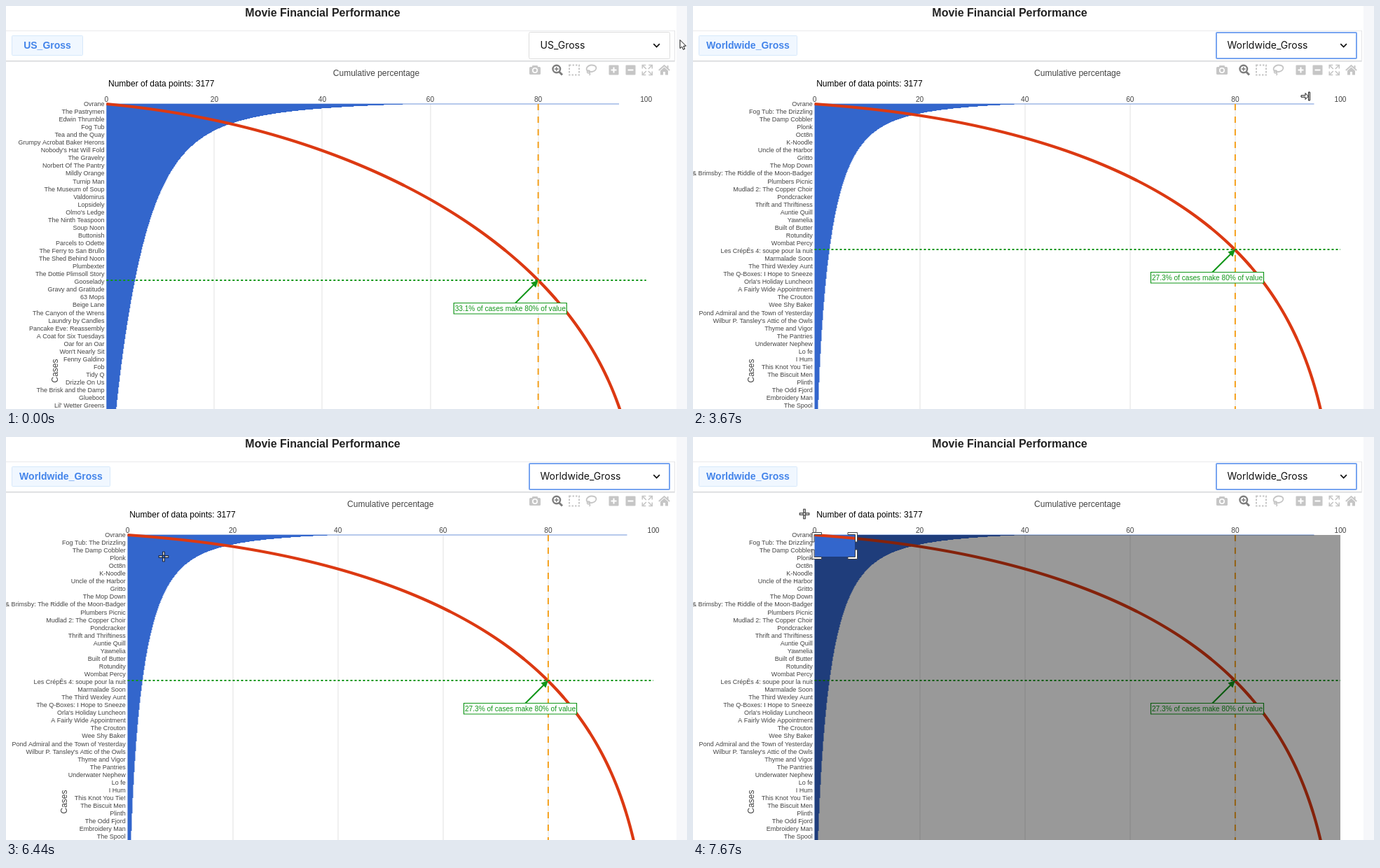
These frames come from a looping animation (972x576 px, 8000 ms). An HTML page with a canvas:

```html
<!DOCTYPE html>
<html lang="en">
<head>
<meta charset="utf-8">
<title>Pareto chart</title>
<style>
html, body { margin: 0; width: 100%; height: 100%; overflow: hidden; background: #fff; }
canvas { display: block; }
</style>
</head>
<body>
<canvas id="stage" width="972" height="576"></canvas>
<script>
const ctx = document.getElementById('stage').getContext('2d');
const LOOP = 8000, TICK = 1000 / 9, TAU = Math.PI * 2;
const TOP = 140, BOTTOM = 576, FULL = 761;
const SANS = '"Liberation Sans", Arial, sans-serif';
const UI = 'Inter, "Open Sans", sans-serif';
const BLUE = '#3366cc', RED = '#dc3912', ORANGE = '#f5a11d', GREEN = '#109618', INK = '#444';
const OPTIONS = ['US_Gross', 'Worldwide_Gross', 'US_DVD_Sales', 'CRIT_Votes'];

// Times of the state changes, in ticks
const OPEN = 14, HOVER = 21, PICK = 26, SWAP = 32, RESIZE = 33, CROSS = 48, DRAG = 59;

// base, peak, decay and rise shape the distribution; barScale turns density into pixels
const usChart = {
  name: OPTIONS[0], tagWidth: 102, x0: 143.3, x1: 913.7, casesX: 69.5, top: 875, cut: 0.331,
  base: 3.5, peak: 7, decay: 0.015, rise: 10, barScale: 41.7,
  labels: `Ovrane|The Pastrymen|Edwin Thrumble|Fog Tub|Tea and the Quay|Grumpy Acrobat Baker Herons
|Nobody's Hat Will Fold|The Gravelry|Norbert Of The Pantry|Mildly Orange|Turnip Man|The Museum of Soup
|Valdomirus|Lopsidely|Olmo's Ledge|The Ninth Teaspoon|Soup Noon|Buttonish|Parcels to Odette
|The Ferry to San Brullo|The Shed Behind Noon|Plumbexter|The Dottie Plimsoll Story|Gooselady
|Gravy and Gratitude|63 Mops|Beige Lane|The Canyon of the Wrens|Laundry by Candles
|Pancake Eve: Reassembly|A Coat for Six Tuesdays|Oar for an Oar|Won't Nearly Sit|Fenny Galdino|Fob
|Tidy Q|Drizzle On Us|The Brisk and the Damp|Glueboot|Lil' Wetter Greens`.split('|')
};
const worldChart = {
  name: OPTIONS[1], tagWidth: 141, x0: 173.5, x1: 924, casesX: 82.5, top: 886.5, cut: 0.273,
  base: 4.1, peak: 10, decay: 0.015, rise: 6, barScale: 21,
  labels: `Ovrane|Fog Tub: The Drizzling|The Damp Cobbler|Plonk|Oct8n|K-Noodle|Uncle of the Harbor|Gritto
|The Mop Down|Pottle & Brimsby: The Riddle of the Moon-Badger|Plumbers Picnic|Mudlad 2: The Copper Choir
|Pondcracker|Thrift and Thriftiness|Auntie Quill|Yawnelia|Built of Butter|Rotundity|Wombat Percy
|Les CrépÊs 4: soupe pour la nuit|Marmalade Soon|The Third Wexley Aunt|The Q-Boxes: I Hope to Sneeze
|Orla's Holiday Luncheon|A Fairly Wide Appointment|The Crouton|Wee Shy Baker
|Pond Admiral and the Town of Yesterday|Wilbur P. Tansley's Attic of the Owls|Thyme and Vigor|The Pantries
|Underwater Nephew|Lo fe|I Hum|This Knot You Tie!|The Biscuit Men|Plinth|The Odd Fjord|Embroidery Man
|The Spool`.split('|')
};

// Pointer key points: tick, x, y
const POINTER = [
  [5, 962, 48.5], [9, 946, 45], [12, 928, 50], [18, 928, 50], [22, 879, 127], [24, 880, 128],
  [32, 880, 128], [33, 874, 129], [47, 874, 129], [48, 547, 146], [51, 178, 264], [54, 231, 171],
  [57, 231, 171], [58, 225, 171], [61, 179, 162], [65, 161, 136.5], [67, 161, 135], [69, 159, 110]
];
const ZOOM_START = { x: 231, y: 171 }, ZOOM_MIN = 20, ZOOM_LAG = 0.6;

function pointerAt(k) {
  const i = POINTER.findIndex(p => p[0] > k);
  const b = POINTER.at(i), a = i > 0 ? POINTER[i - 1] : b;
  const f = a === b ? 0 : (k - a[0]) / (b[0] - a[0]);
  return { x: a[1] + (b[1] - a[1]) * f, y: a[2] + (b[2] - a[2]) * f };
}

function text(str, x, y, size, color, align = 'left', family = SANS, weight = '') {
  ctx.font = `${weight} ${size}px ${family}`;
  ctx.textAlign = align;
  ctx.fillStyle = color;
  ctx.fillText(str, x, y);
}
function rect(x, y, w, h, color) {
  ctx.fillStyle = color;
  ctx.fillRect(x, y, w, h);
}
function path(points, close) {
  ctx.beginPath();
  points.forEach(([x, y]) => ctx.lineTo(x, y));
  if (close) ctx.closePath();
}
function stroke(color, width, dash = []) {
  ctx.strokeStyle = color;
  ctx.lineWidth = width;
  ctx.setLineDash(dash);
  ctx.stroke();
  ctx.setLineDash([]);
}
function line(xa, ya, xb, yb, color, width, dash) {
  path([[xa, ya], [xb, yb]]);
  stroke(color, width, dash);
}
function box(x, y, w, h, r, fill, edge, width = 1) {
  ctx.beginPath();
  ctx.roundRect(x, y, w, h, r);
  ctx.fillStyle = fill;
  ctx.fill();
  if (edge) stroke(edge, width);
}
function outlined(points, fill, edge) {
  path(points, true);
  ctx.fillStyle = fill;
  ctx.fill();
  stroke(edge, 1);
}

// Share of the total value not yet covered by the first u of all cases
const remaining = (c, u) =>
  Math.exp(-c.base * u - c.peak * c.decay * Math.log(1 + u / c.decay) - c.rise * u ** 3 / 3);
// Its falling rate, which is the size of the bar at u
const density = (c, u) =>
  remaining(c, u) * (c.base + c.peak / (1 + u / c.decay) + c.rise * u * u);

function drawChart(c) {
  const width = c.x1 - c.x0, at = v => c.x0 + v * width / 100;
  for (let v = 20; v < 100; v += 20) rect(Math.round(at(v)) - 0.5, TOP, 1, BOTTOM - TOP, '#e1e1e1');

  rect(c.x0, 139.5, c.top - c.x0, 1, '#6f93da');
  const curve = [];
  for (let y = TOP; y <= BOTTOM + 3; y++) {
    const u = (y - TOP) / FULL;
    rect(c.x0, y, Math.round(c.barScale * density(c, u + 0.5 / FULL)), 1, BLUE);
    curve.push([c.x0 + width * (1 - remaining(c, u)), y]);
  }
  path(curve);
  stroke(RED, 4.2);

  const x80 = at(80), cutY = Math.round(TOP + c.cut * FULL);
  line(x80, TOP, x80, BOTTOM, ORANGE, 2, [9, 9]);
  line(c.x0, cutY, c.x1, cutY, GREEN, 2, [3, 3]);

  line(x80 - 33, cutY + 33, x80 - 5, cutY + 5, GREEN, 2);
  path([[x80, cutY], [x80 - 3.5, cutY + 10.5], [x80 - 10.5, cutY + 3.5]], true);
  ctx.fillStyle = GREEN;
  ctx.fill();
  box(x80 - 120.4, cutY + 32.5, 161, 15.5, 0, '#fff', GREEN, 1.2);
  text(`${(c.cut * 100).toFixed(1)}% of cases make 80% of value`, x80 - 39.9, cutY + 44, 10.15, GREEN, 'center');

  for (let v = 0; v <= 100; v += 20) text(v, at(v), 137, 10.2, INK, 'center');
  c.labels.forEach((s, i) => text(s.trim(), c.x0 - 2.8, 142.9 + i * 11.06, 9, INK, 'right'));
  text('Cumulative percentage', at(50), 99.5, 12, INK, 'center');
  text('Number of data points: 3177', c.x0 + 2.7, 115.3, 12, '#000');
  ctx.save();
  ctx.translate(c.casesX + 4, 521.5);
  ctx.rotate(-Math.PI / 2);
  text('Cases', 0, 0, 12, INK, 'center');
  ctx.restore();
}

function drawTools() {
  const g = '#c6c6c6', dark = '#7c7c7c';
  box(747, 87, 16, 11, 1.5, g);
  box(751, 85, 8, 4, 1, g);
  ctx.beginPath();
  ctx.arc(755, 92, 3.2, 0, TAU);
  stroke('#fff', 1.6);

  ctx.beginPath();
  ctx.arc(785.8, 90, 5.3, 0, TAU);
  stroke(dark, 2.4);
  line(789.5, 94, 794, 98.5, dark, 3);
  line(783, 90, 788.6, 90, dark, 1.5);
  line(785.8, 87.2, 785.8, 92.8, dark, 1.5);

  ctx.beginPath();
  ctx.rect(804, 84.5, 14, 14);
  stroke(g, 2, [2.5, 2]);

  ctx.beginPath();
  ctx.ellipse(835.5, 89.3, 7, 4.8, -0.15, 0, TAU);
  stroke(g, 1.9);
  ctx.beginPath();
  ctx.arc(831.5, 94, 2, 0, TAU);
  ctx.moveTo(832, 95);
  ctx.quadraticCurveTo(835, 97, 832.5, 99);
  stroke(g, 1.5);

  for (const x of [867.5, 891.5]) {
    box(x - 7, 84.5, 14, 14, 1, g);
    line(x - 4, 91.5, x + 4, 91.5, '#fff', 2);
  }
  line(867.5, 87.5, 867.5, 95.5, '#fff', 2);

  for (const sx of [-1, 1]) for (const sy of [-1, 1]) {
    const x = 915.3 + sx * 7, y = 91.5 + sy * 7;
    line(915.3 + sx * 1.5, 91.5 + sy * 1.5, x, y, g, 1.7);
    path([[x - sx * 5, y], [x, y], [x, y - sy * 5]]);
    stroke(g, 1.6);
  }

  path([[931.8, 92], [939.5, 85], [947.2, 92]]);
  stroke(g, 1.9);
  path([[934, 92.5], [939.5, 87.5], [945, 92.5], [945, 98.5], [941, 98.5], [941, 94], [938, 94],
    [938, 98.5], [934, 98.5]], true);
  ctx.fillStyle = g;
  ctx.fill();
  rect(943.5, 85, 2, 4, g);
}

function drawSelect(k) {
  if (k < SWAP) {
    ctx.globalAlpha = Math.min(1, Math.max(0, (k - OPEN + 1) / 3));
    box(746.5, 37, 201, 38.5, 3, '#fff', '#c3d0f0', 3.5);
    ctx.globalAlpha = 1;
    box(746.5, 37.5, 201, 38, 2, '#fff', k < OPEN ? '#dcdcdc' : '#b3c0e2');
  } else {
    box(747, 38, 200, 37, 1, '#fff', '#78a5f0', 2);
  }
  text(OPTIONS[k < PICK ? 0 : 1], 762.5, 61.2, 14, '#111', 'left', UI);
  path([[924.3, 54.2], [928.6, 58.6], [932.9, 54.2]]);
  stroke('#111', 1.7);
}

function drawHeader(c) {
  text('Movie Financial Performance', 452, 14.5, 16, '#222', 'center', SANS, 'bold');
  rect(957, 0, 15, BOTTOM, '#f6f7fa');
  rect(0, 35, 955, 1, '#e9eaec');
  rect(0, 78, 955, 1.4, '#d3d4d6');
  rect(954, 35, 1, 44, '#e4e5e8');
  box(8.5, 42.5, c.tagWidth - 1, 28, 1, '#f0f7ff', '#d6e8fb');
  text(c.name, 8 + c.tagWidth / 2, 61.3, 14, '#4384ea', 'center', SANS, 'bold');
}

function drawMenu(k) {
  const active = k < HOVER ? 0 : 1;
  box(747.5, 76.5, 199, 107.5, 7, '#fff', '#a3a3a3');
  OPTIONS.forEach((s, i) => {
    const y = 93.5 + i * 24.4;
    if (i === active) box(752.5, y - 12, 189, 24.3, 1, '#4a9bf0');
    text(s, 758.8, y + 5, 14.2, i === active ? '#fff' : '#444', 'left', UI);
  });
}

function drawZoom(k, c) {
  const p = pointerAt(k - ZOOM_LAG), right = ZOOM_START.x, mid = ZOOM_START.y;
  const left = Math.max(c.x0, p.x);
  const wide = mid - p.y < ZOOM_MIN;
  const top = wide ? TOP : Math.max(TOP, p.y), bottom = wide ? BOTTOM : mid;
  ctx.beginPath();
  ctx.rect(c.x0, TOP, c.x1 - c.x0, BOTTOM - TOP);
  ctx.rect(left, top, right - left, bottom - top);
  ctx.fillStyle = 'rgba(0,0,0,0.4)';
  ctx.fill('evenodd');

  if (wide) {
    const y0 = mid - ZOOM_MIN - 0.5, y1 = mid + ZOOM_MIN + 0.5;
    for (const x of [left - 3.5, right + 0.5]) {
      outlined([[x, y0], [x + 3, y0], [x + 3, y1], [x, y1]], '#fff', INK);
    }
    return;
  }
  const n = Math.floor(Math.min(20, bottom - top) / 2);
  for (const [x, sx] of [[left, 1], [right, -1]]) for (const [y, sy] of [[top, 1], [bottom, -1]]) {
    const q = (a, b) => [x + sx * a, y + sy * b];
    outlined([q(-3.5, n), q(-0.5, n), q(-0.5, -0.5), q(n, -0.5), q(n, -3.5), q(-3.5, -3.5)], '#fff', INK);
  }
}

function drawArrow() {
  outlined([[0, 0], [0, 12], [2.8, 9.6], [4.7, 13.8], [6.8, 12.9], [5, 8.8], [8.6, 8.6]], '#fff', '#111');
}
function drawResize() {
  outlined([[-6, -1.2], [0, -1.2], [0, -4.5], [4.4, 0], [0, 4.5], [0, 1.2], [-6, 1.2]], '#fff', '#111');
  outlined([[4.5, -6], [6.5, -6], [6.5, 6], [4.5, 6]], '#fff', '#111');
}
function drawCross() {
  for (const [w, color, len] of [[3.4, '#111', 7.3], [1.4, '#fff', 6.4]]) {
    for (const s of [-1, 1]) {
      line(s * (8.6 - len), 0, s * len, 0, color, w);
      line(0, s * (8.6 - len), 0, s * len, color, w);
    }
  }
}

function drawPointer(k) {
  const { x, y } = pointerAt(k);
  ctx.save();
  ctx.translate(x, y);
  (k < RESIZE ? drawArrow : k < CROSS ? drawResize : drawCross)();
  ctx.restore();
}

function frame() {
  // The screen updates nine times a second
  const k = Math.floor((performance.now() % LOOP + 6) / TICK);
  const chart = k < SWAP ? usChart : worldChart;
  rect(0, 0, 972, 576, '#fff');
  drawChart(chart);
  drawHeader(chart);
  drawSelect(k);
  drawTools();
  if (k >= DRAG) drawZoom(k, chart);
  if (k >= OPEN && k < PICK) drawMenu(k);
  drawPointer(k);
  requestAnimationFrame(frame);
}
frame();
</script>
</body>
</html>
```
